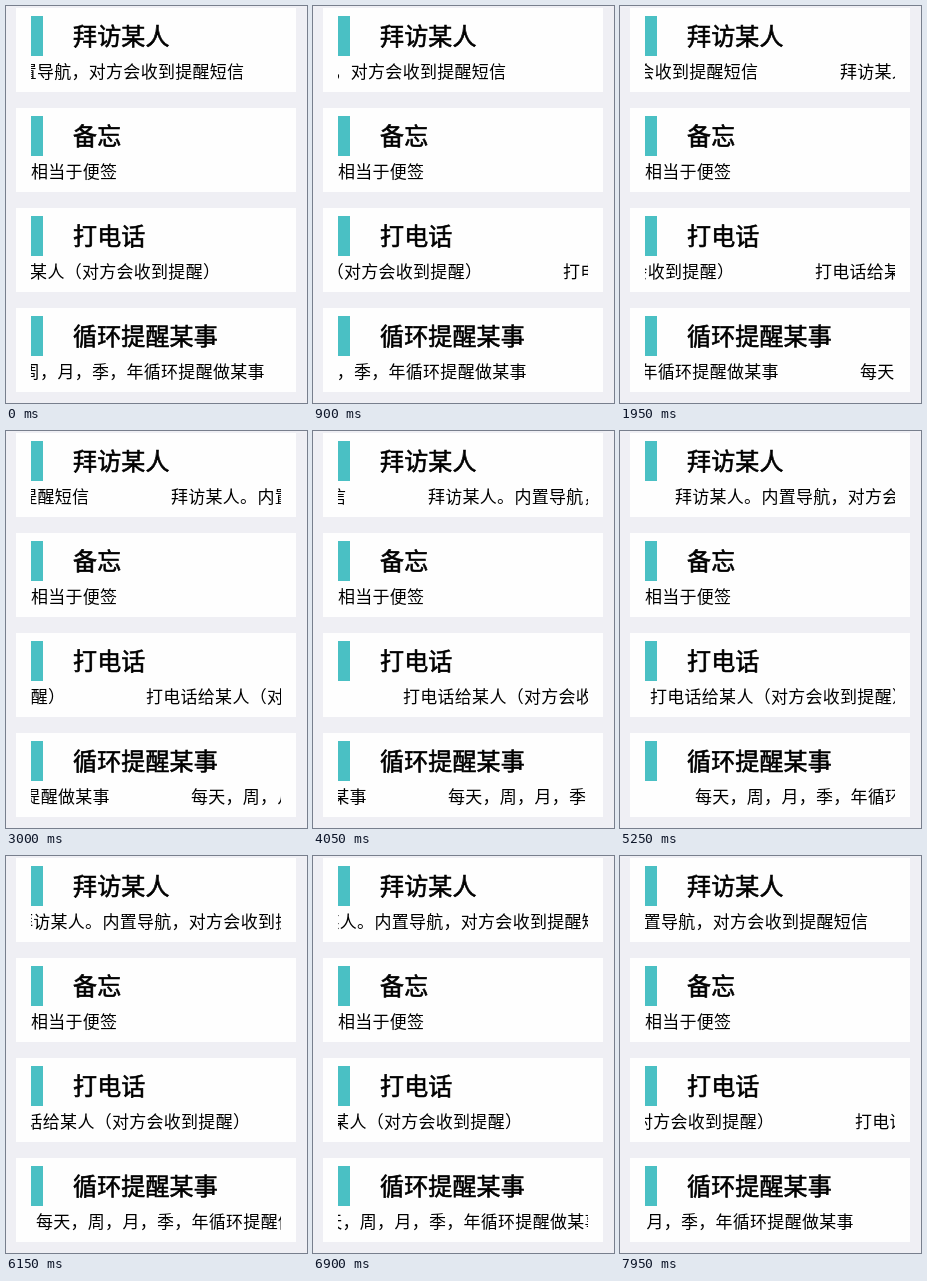
These frames come from a looping animation (301 px wide and 397 px high, 8000 ms). An HTML page:

```html
<!DOCTYPE html>
<html lang="zh-CN">
<head>
<meta charset="utf-8">
<style>
  html, body { margin: 0; width: 100%; height: 100%; overflow: hidden; background: #efeff4; }
  body { position: relative; color: #000; font-family: "Noto Sans CJK SC", "Noto Sans CJK", sans-serif; }
  .card { position: absolute; left: 10px; width: 280px; height: 84px; background: #fefefe; }
  .bar { position: absolute; left: 15px; top: 8px; width: 12px; height: 40px; background: #4ac0c4; }
  .title { position: absolute; left: 57px; top: 7px; font-size: 24px; letter-spacing: .15px; line-height: 40px; white-space: nowrap; -webkit-text-stroke: .6px #000; }
  .strip { position: absolute; left: 15px; top: 50px; width: 250px; height: 28px; overflow: hidden; }
  .strip span { position: absolute; left: 0; top: -1px; font-size: 17px; letter-spacing: .28px; line-height: 28px; white-space: nowrap; }
</style>
</head>
<body>
<script>
const LOOP = 8000, FRAME = 150, STEP = 5;

// start: first position inside the strip; period: distance between copies (0 = still)
const rows = [
  { title: '拜访某人', text: '拜访某人。内置导航，对方会收到提醒短信', start: -115, period: 410 },
  { title: '备忘', text: '相当于便签', start: 0, period: 0 },
  { title: '打电话', text: '打电话给某人（对方会收到提醒）', start: -70, period: 340 },
  { title: '循环提醒某事', text: '每天，周，月，季，年循环提醒做某事', start: -60, period: 375 }
];

function add(parent, cls, text = '', tag = 'div') {
  const el = document.createElement(tag);
  el.className = cls;
  el.textContent = text;
  return parent.appendChild(el);
}

rows.forEach((row, i) => {
  const card = add(document.body, 'card');
  card.style.top = 2 + 100 * i + 'px';
  add(card, 'bar');
  add(card, 'title', row.title);
  const strip = add(card, 'strip');
  const copies = row.period ? 3 : 1;
  row.spans = Array.from({ length: copies }, () => add(strip, '', row.text, 'span'));
});

// The text advances in 5px ticks, about ten a second, with a slight timer drift.
function ticks(t) {
  const k = Math.floor(t / FRAME);
  const drift = 0.03 * Math.cos(2 * Math.PI * k * FRAME / 6900);
  return Math.floor(k * 1.5 + 1 - drift);
}

function draw(now) {
  const shift = STEP * ticks(now % LOOP);
  for (const { spans, start, period } of rows) {
    if (!period) continue;
    spans.forEach((span, i) => {
      span.style.transform = `translateX(${start + i * period - shift}px)`;
    });
  }
  requestAnimationFrame(draw);
}
draw(performance.now());
</script>
</body>
</html>
```
